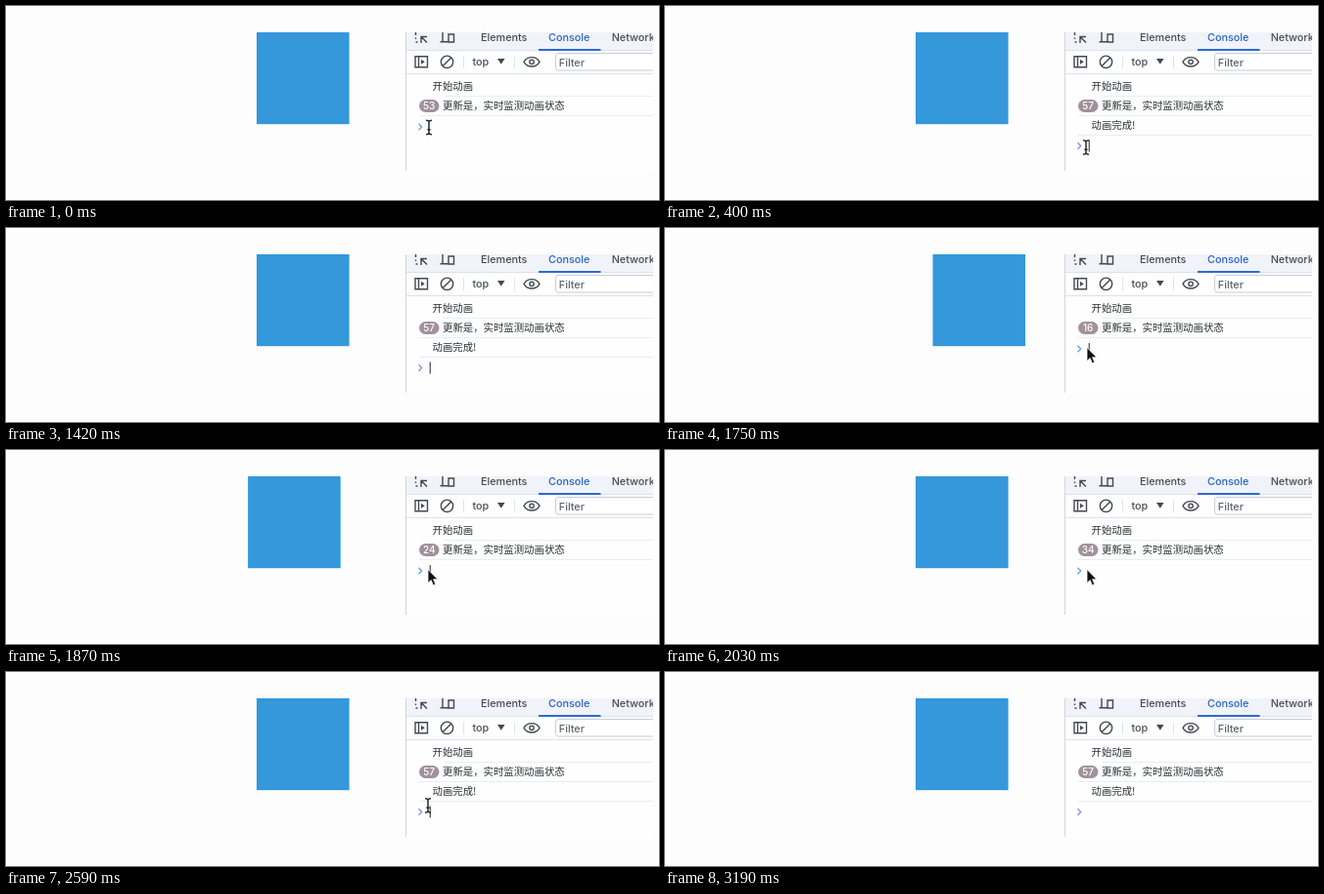
An HTML page that plays this animation: 667 by 199 pixels, repeating every 3350 ms.

```html
<!DOCTYPE html>
<html lang="zh">
<head>
<meta charset="utf-8">
<title>Animation callbacks</title>
<style>
html, body { margin: 0; width: 100%; height: 100%; overflow: hidden; background: #fdfdfd; }
svg { display: block; width: 667px; height: 199px; }
text { font-family: Inter, "Liberation Sans", sans-serif; font-size: 10.8px; font-weight: 500; fill: #484c53; }
.soft { filter: blur(.4px); }
.log { font-family: "Noto Sans CJK SC", "Noto Sans CJK", sans-serif; font-size: 10.4px; fill: #2a2d32; }
.icon { fill: none; stroke: #44484f; stroke-width: 1.4; }
.rule { fill: none; stroke: #e9ecf2; stroke-width: 1; }
</style>
</head>
<body>
<svg viewBox="0 0 667 199">
  <defs>
    <clipPath id="view"><rect y="27" width="661" height="142"/></clipPath>
  </defs>
  <g clip-path="url(#view)">
   <g class="soft">
    <rect id="box" x="256" y="20" width="94.6" height="101.2" fill="#3498db"/>

    <rect x="408" y="20" width="262" height="160" fill="#fefefe"/>
    <rect x="409" y="20" width="262" height="25" fill="#f0f3f9"/>
    <path d="M408.5 20V180" stroke="#d3d6dc"/>
    <path d="M409 45.5H670M409 69.5H670" class="rule" style="stroke:#dbe2ee"/>
    <path d="M544 45H607.5" stroke="#2a6bd4" stroke-width="1.8"/>

    <!-- tab bar -->
    <g class="icon">
      <path d="M418.5 27V30M418.5 32.5V34M418.5 37H420.5M424 38V31.5H430M424.8 32.2L430 37.6"/>
      <path d="M446 24V36.5M443.5 36.7H451.5M452 29H457.5V37H452Z"/>
    </g>
    <text x="485" y="36.2">Elements</text>
    <text x="554" y="36.2" style="fill:#2a63c8">Console</text>
    <text x="618.7" y="36.2">Network</text>

    <!-- toolbar -->
    <g class="icon">
      <path d="M418 51.8H430.5V62.8H418ZM421.5 52V62.6"/>
      <path d="M424 54.8L427.8 57.3L424 59.8Z" fill="#44484f" stroke="none"/>
      <circle cx="450.5" cy="57.3" r="6.2"/>
      <path d="M446.2 61.6L454.8 53"/>
      <path d="M529 57.3C532.5 51 541.5 51 545 57.3C541.5 63.6 532.5 63.6 529 57.3Z"/>
      <circle cx="537" cy="57.3" r="2.2"/>
    </g>
    <path d="M467.5 51V64M519.5 51V64" class="rule" style="stroke:#dfe3ea"/>
    <text x="476.5" y="61">top</text>
    <path d="M502 54H509.5L505.75 59.7Z" fill="#44484f"/>
    <rect x="561.5" y="48.5" width="120" height="17.5" rx="2.5" fill="#fff" stroke="#c9cdd6"/>
    <text x="564.8" y="61.8" style="fill:#5f636a">Filter</text>

    <!-- messages -->
    <text class="log" x="435.5" y="86.3">开始动画</text>
    <path d="M447 92.5H670M422 112.5H670" class="rule"/>
    <rect x="422" y="96" width="20.5" height="13" rx="6.5" fill="#a2919b"/>
    <text id="count" x="432.2" y="106.2" text-anchor="middle" style="fill:#fff;font-size:10px"></text>
    <text class="log" x="446" y="106.2">更新是，实时监测动画状态</text>
    <g id="done">
      <text class="log" x="435.5" y="126.4">动画完成!</text>
      <path d="M422 132.5H670" class="rule"/>
    </g>
    <g id="prompt">
      <path id="chevron" d="M421.5 -3.3L424.7 0L421.5 3.3" fill="none" stroke-width="1.3"/>
      <path id="caret" d="M433.3 -6V6" stroke="#55585e" stroke-width="1.3"/>
    </g>

    <!-- pointers -->
    <path id="beam" d="M-3 -7.2Q-.4 -7.2 0 -5.6Q.4 -7.2 3 -7.2M0 -5.8V5.8M-3 7.2Q-.4 7.2 0 5.6Q.4 7.2 3 7.2M-1.6 2.2H1.6"
      fill="none" stroke="#26282c" stroke-width="1.5"/>
    <path id="arrow" d="M0 0V14L3.2 11L5.4 16.2L7.8 15.2L5.6 10.2H10Z" fill="#111" stroke="#fff" stroke-width=".8"/>
   </g>
  </g>
</svg>
<script>
const LOOP = 3350, TOTAL = 57;
const RUN = { start: 1456, length: 920, from: 6, to: 256 };

// [time, updates, caret, pointer, x, y]
const STEPS = [
  [0, 53, 0, 'beam', 432, 124.5],
  [160, 57, 0, 'beam', 432, 130],
  [280, 57, 1, 'beam', 431, 139],
  [400, 57, 1, 'beam', 430, 145],
  [560, 57, 1, 'beam', 436, 156],
  [680, 57, 1, 'beam', 456, 166],
  [800, 57, 0],
  [1420, 57, 1],
  [1710, 14, 1, 'arrow', 431, 122.5],
  [1750, 16, 1, 'arrow', 431, 122.5],
  [1870, 24, 1, 'arrow', 431, 122.5],
  [2030, 34, 0, 'arrow', 431, 122.5],
  [2190, 44, 0, 'beam', 431.5, 129],
  [2310, 52, 0, 'beam', 431, 133],
  [2470, 57, 1, 'beam', 431, 135],
  [2590, 57, 1, 'beam', 431, 137],
  [2750, 57, 1, 'beam', 433, 150],
  [2870, 57, 1, 'beam', 442, 163],
  [3030, 57, 1, 'beam', 457, 167],
  [3190, 57, 0]
];

const el = id => document.getElementById(id);
const show = (id, on) => el(id).style.display = on ? '' : 'none';
const elastic = p => 1 - 2 ** (-10 * p) * Math.cos(4 * Math.PI * p);

function boxX(t, count) {
  if (count === TOTAL || t < RUN.start) return RUN.to;
  const p = Math.min(1, (t - RUN.start) / RUN.length);
  return RUN.from + (RUN.to - RUN.from) * elastic(p);
}

let last;
function draw(step) {
  const [t, count, caret, pointer, x, y] = step;
  const done = count === TOTAL;
  el('box').setAttribute('x', boxX(t, count).toFixed(1));
  el('count').textContent = count;
  show('done', done);
  show('caret', caret);
  el('prompt').setAttribute('transform', `translate(0 ${done ? 143.5 : 124})`);
  el('chevron').setAttribute('stroke', done ? '#8190e4' : '#5fa5ea');
  for (const id of ['beam', 'arrow']) show(id, id === pointer);
  if (pointer) el(pointer).setAttribute('transform', `translate(${x} ${y})`);
}

const origin = performance.now();
function tick() {
  const t = (performance.now() - origin) % LOOP;
  const step = STEPS.findLast(s => s[0] <= t);
  if (step !== last) draw(last = step);
  requestAnimationFrame(tick);
}
tick();
</script>
</body>
</html>
```
